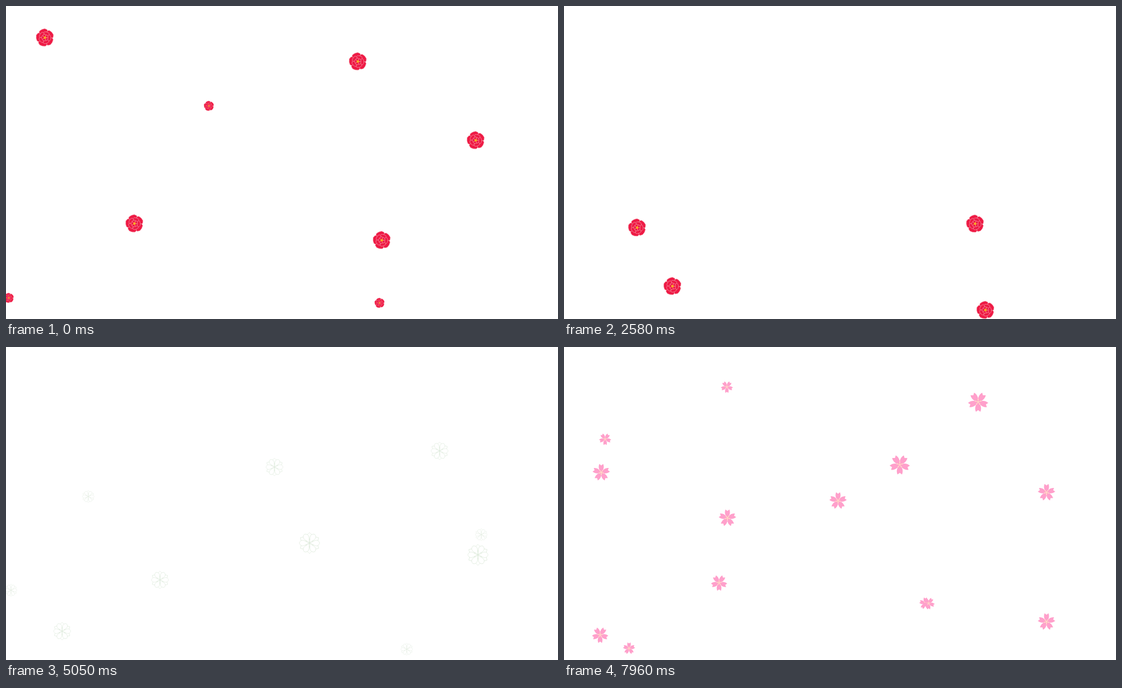
These frames come from a looping animation (993x564 px, 7990 ms). An HTML page with a canvas:

```html
<!DOCTYPE html>
<html lang="en">
<head>
<meta charset="utf-8">
<title>Falling blossoms</title>
<style>
  html, body { margin: 0; height: 100%; overflow: hidden; background: #fff; }
  canvas { display: block; width: 993px; height: 564px; }
</style>
</head>
<body>
<canvas id="stage" width="993" height="564"></canvas>
<script>
const ctx = document.getElementById('stage').getContext('2d');
const LOOP = 7990, STEP = 30, TAU = Math.PI * 2;

// Blossoms are drawn with a radius of 1, first petal pointing up.
function ring(count, offset, drawPetal) {
  for (let i = 0; i < count; i++) {
    ctx.save();
    ctx.rotate(offset + i * TAU / count);
    drawPetal();
    ctx.restore();
  }
}

function shape(build, fill, stroke, width) {
  ctx.beginPath();
  build();
  ctx.closePath();
  ctx.fillStyle = fill;
  ctx.fill();
  if (!stroke) return;
  ctx.strokeStyle = stroke;
  ctx.lineWidth = width;
  ctx.stroke();
}

function camellia() {
  const petal = reach => {
    ctx.save();
    ctx.scale(reach, reach);
    shape(() => {
      ctx.moveTo(0, 0);
      ctx.lineTo(-0.5, -0.66);
      ctx.lineTo(-0.42, -0.86);
      ctx.quadraticCurveTo(-0.1, -1.04, 0.25, -0.98);
      ctx.lineTo(0.48, -0.8);
      ctx.lineTo(0.48, -0.62);
    }, '#ee1a45', '#f7b0b8', 0.035 / reach);
    ctx.restore();
  };
  ring(5, -0.26, () => petal(1));
  ring(5, 0.37, () => petal(0.68));
  ring(5, -0.26, () => petal(0.38));
  ring(5, 0.37, () => shape(() => {
    ctx.moveTo(-0.09, 0);
    ctx.lineTo(0, -0.22);
    ctx.lineTo(0.09, 0);
  }, '#f9b321'));
}

function daisy() {
  const edge = '#d5e4d2', width = 0.03;
  ring(6, 0, () => shape(() => {
    ctx.moveTo(0, -0.3);
    ctx.lineTo(-0.22, -0.78);
    ctx.lineTo(0, -1);
    ctx.lineTo(0.22, -0.78);
  }, '#fff', edge, width));
  ring(6, TAU / 12, () => shape(() => {
    ctx.moveTo(0, 0);
    ctx.bezierCurveTo(-0.05, -0.3, -0.34, -0.45, -0.24, -0.78);
    ctx.quadraticCurveTo(-0.12, -0.95, 0, -0.96);
    ctx.quadraticCurveTo(0.12, -0.95, 0.24, -0.78);
    ctx.bezierCurveTo(0.34, -0.45, 0.05, -0.3, 0, 0);
  }, '#fff', edge, width));
}

function cherry() {
  const cream = '#ffe0c4';
  ring(5, 0, () => shape(() => {
    ctx.moveTo(0, 0.05);
    ctx.bezierCurveTo(-0.2, -0.25, -0.42, -0.55, -0.23, -1.02);
    ctx.lineTo(0, -0.84);
    ctx.lineTo(0.23, -1.02);
    ctx.bezierCurveTo(0.42, -0.55, 0.2, -0.25, 0, 0.05);
  }, '#ffa0cb'));
  ring(5, TAU / 10, () => {
    shape(() => { ctx.moveTo(0, 0); ctx.lineTo(0, -0.27); }, cream, cream, 0.06);
    shape(() => ctx.arc(0, -0.28, 0.06, 0, TAU), cream);
  });
}

// Spreads daisies down the stage, closer together near the top; the middle two are small.
function cascade(size, top, bottom, bend, columns) {
  const layers = { [size]: [], 22: [] };
  columns.forEach((x, i) => {
    const y = top + (bottom - top) * (i / (columns.length - 1)) ** bend;
    layers[i === 2 || i === 3 ? 22 : size].push([x, y]);
  });
  return layers;
}

// A wave appears at `from` and drifts by (vx, vy) pixels per second.
// Its layers list, by blossom size, the positions held at time `at`.
const waves = [
  { draw: camellia, from: 0, at: 0, vx: 48.5, vy: 173.6, layers: {
    32: [[70, 57], [633, 100], [845, 242], [231, 392], [676, 422]],
    18: [[365, 180], [5, 526], [672, 535]] } },
  { draw: camellia, from: 450, at: 990, vx: 4.1, vy: 160.6, layers: {
    32: [[125, 144], [733, 137], [859, 326], [656, 487], [80, 383]],
    18: [[384, 345]] } },
  { draw: daisy, from: 3850, at: 4300, vx: 25.3, vy: 311,
    layers: cascade(38, 120, 460, 2, [527, 830, -10, 702, 453]) },
  { draw: daisy, from: 4090, at: 4300, vx: -40, vy: 179,
    layers: cascade(32, 53, 480, 1.5, [810, 513, 178, 885, 307, 131, 958]) },
  { draw: daisy, from: 5080, at: 5800, vx: 25.3, vy: 311,
    layers: cascade(33, 219, 449, 2, [778, 358, 73, 900, 275, 697]) },
  { draw: cherry, from: 7290, at: 7960, vx: 30, vy: 295, layers: {
    30: [[67, 226], [294, 308], [493, 277], [868, 262], [868, 495]],
    21: [[117, 543], [650, 462]] } },
  { draw: cherry, from: 7610, at: 7960, vx: 10, vy: 174, turn: TAU / 10, layers: {
    35: [[745, 99], [604, 212]],
    28: [[279, 425], [65, 519]],
    21: [[293, 72], [74, 166], [656, 462]] } }
];

function drawWave({ draw, at, vx, vy, turn = 0, layers }, time) {
  const seconds = (time - at) / 1000;
  for (const [size, points] of Object.entries(layers)) {
    for (const [x, y] of points) {
      ctx.save();
      ctx.translate(x + vx * seconds, y + vy * seconds);
      ctx.rotate(turn);
      ctx.scale(size / 2, size / 2);
      draw();
      ctx.restore();
    }
  }
}

function render(now) {
  const raw = now % LOOP;
  const shift = raw < 3800 ? 0 : 10;
  const time = Math.floor((raw - shift) / STEP) * STEP + shift;
  ctx.clearRect(0, 0, 993, 564);
  for (const wave of waves) if (time >= wave.from) drawWave(wave, time);
}

const start = performance.now();
function tick() {
  render(performance.now() - start);
  requestAnimationFrame(tick);
}
tick();
</script>
</body>
</html>
```
